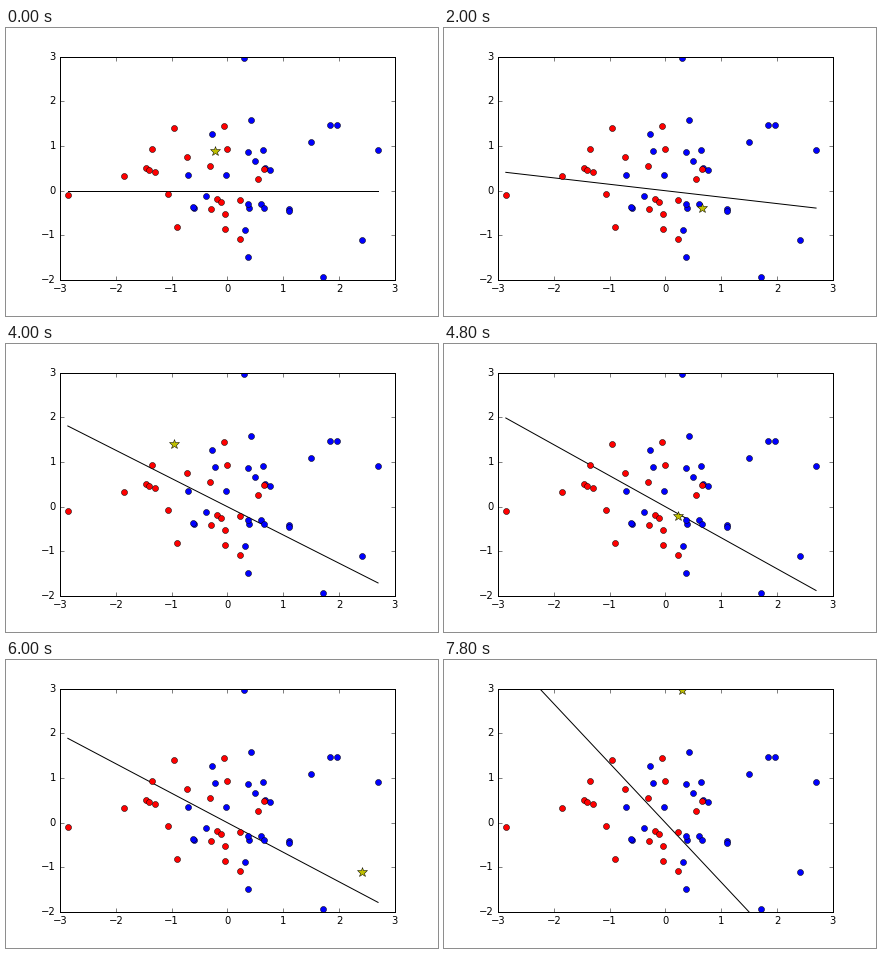
Recreate the animation shown at these times as a matplotlib script. Size 432x288 px, loop 8 s.

```python
import numpy as np
import matplotlib.pyplot as plt
from matplotlib.animation import FuncAnimation

plt.style.use("classic")
plt.rcParams.update({
    "font.family": "DejaVu Sans",
    "font.size": 10,
    "figure.facecolor": "white",
    "savefig.facecolor": "white",
    "savefig.dpi": "figure",
})

FRAMES, INTERVAL = 40, 200

# Samples in the order they are visited by the learner.
samples = np.array([
    (-.23, .88), (.39, -.39), (-.19, -.19), (-.02, .35), (.55, .26),
    (2.70, .91), (-1.29, .42), (0, .93), (.60, -.30), (-.04, -.86),
    (.66, -.39), (-2.86, -.10), (-.70, .35), (-1.85, .33), (1.10, -.41),
    (-.32, .55), (1.96, 1.47), (-1.45, .51), (.37, -1.49), (1.84, 1.47),
    (-.95, 1.40), (.50, .66), (-.90, -.82), (-.38, -.12), (.22, -.21),
    (1.50, 1.09), (-.06, 1.45), (-.60, -.39), (-.05, -.53), (.64, .91),
    (2.41, -1.11), (-1.35, .93), (1.72, -1.94), (-.72, .75), (1.11, -.46),
    (.23, -1.09), (.68, .50), (-.11, -.25), (-.27, 1.27), (.30, 2.97),
    (.43, 1.58), (.37, -.30), (.32, -.89), (.76, .46), (-.62, -.37),
    (.66, .48), (-1.41, .46), (-1.07, -.08), (-.30, -.42), (.37, .86),
])
labels = np.array(list("bbrbr" "brrbr" "brbrb" "rbrbb" "rbrbr"
                       "brbrb" "brbrb" "rbrbb" "bbbbb" "rrrrb"))

# Slope of the decision boundary as it is learned.
key_steps = [0, 4, 10, 16, 18, 22, 24, 27, 30, 36, 39]
key_slopes = [0, -.0325, -.144, -.414, -.53, -.735, -.695, -.74, -.661,
              -1.145, -1.333]
slopes = np.interp(np.arange(FRAMES), key_steps, key_slopes)

fig = plt.figure(figsize=(6, 4), dpi=72)
ax = fig.add_axes([.125, .125, .775, .775])
ax.set(xlim=(-3, 3), ylim=(-2, 3), xticks=range(-3, 4), yticks=range(-2, 4))

span = np.array([samples[:, 0].min(), samples[:, 0].max()])
boundary, = ax.plot(span, 0 * span, "k", lw=1)


def markers(style, size):
    return ax.plot([], [], style, ms=size, mec="k", mew=.5)[0]


dots = {c: markers(c + "o", 6) for c in "br"}
star = markers("y*", 10)


def draw(step):
    rest = np.arange(len(samples)) != step
    for color, dot in dots.items():
        dot.set_data(*samples[rest & (labels == color)].T)
    star.set_data(*samples[step:step + 1].T)
    boundary.set_ydata(slopes[step] * span)
    return boundary, *dots.values(), star


anim = FuncAnimation(fig, draw, frames=FRAMES, interval=INTERVAL,
                     init_func=lambda: draw(0), repeat=True, repeat_delay=0)
plt.show()
```
